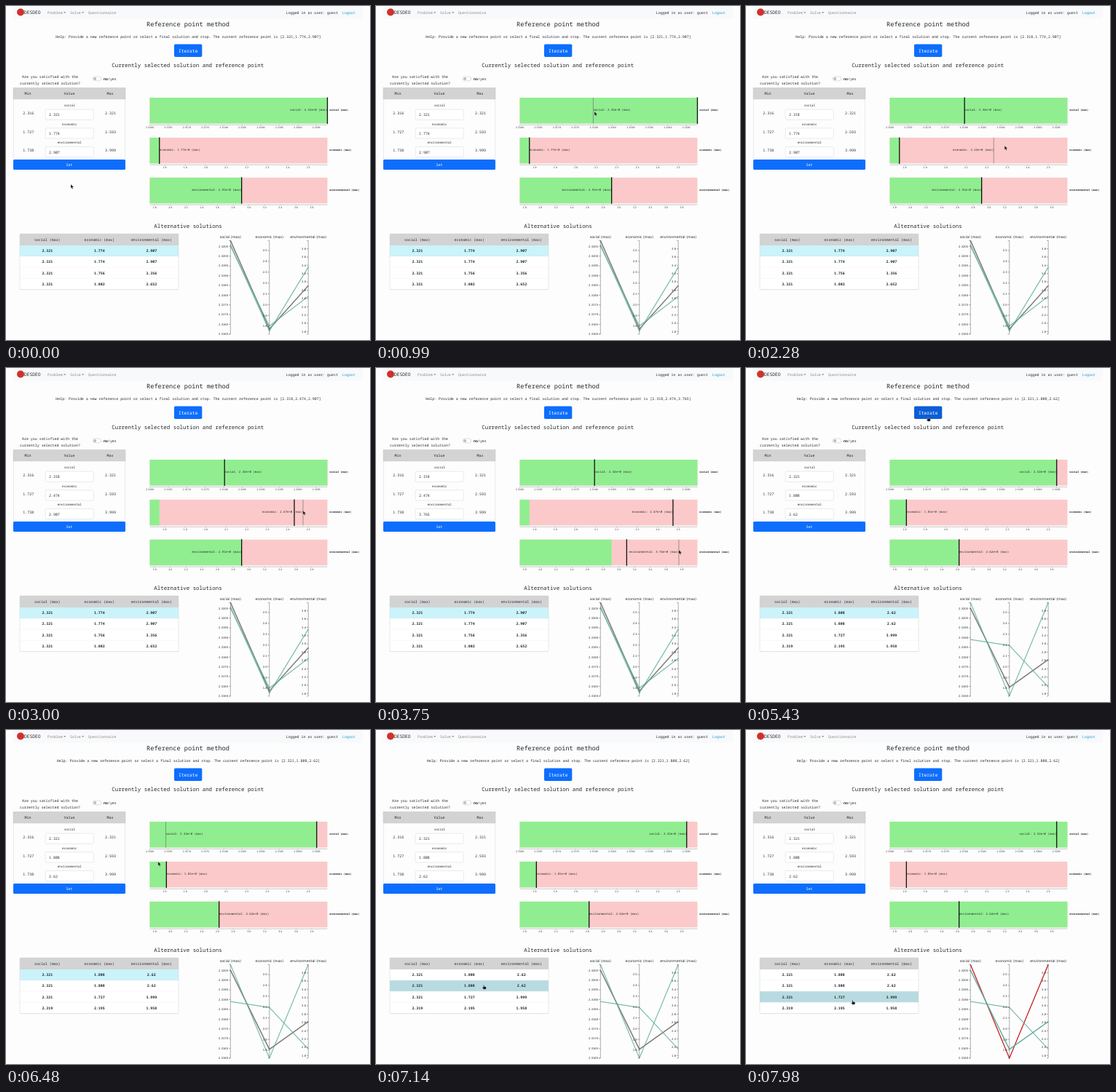
Animation of 500x459 px, one loop 8 s. Source, as an HTML page:

```html
<!DOCTYPE html>
<html lang="en">
<head>
<meta charset="utf-8">
<title>Reference point method</title>
<style>
html, body { margin: 0; width: 100%; height: 100%; overflow: hidden; background: #fdfdfd; }
svg { display: block; width: 100vw; height: 100vh; }
text { font-family: "Noto Sans Mono", "DejaVu Sans Mono", monospace; font-size: 4.95px; fill: #24282c; text-rendering: geometricPrecision; white-space: pre; }
.sans { font-family: "DejaVu Sans", sans-serif; }
</style>
</head>
<body>
<svg id="stage" viewBox="0 0 500 459"></svg>
<script>
const LOOP = 8000, LAG = 60, MOVE = 400, ITERATE = 5100;
const stage = document.getElementById('stage');

function add(tag, attrs, parent = stage) {
  const el = document.createElementNS('http://www.w3.org/2000/svg', tag);
  set(el, attrs);
  parent.appendChild(el);
  return el;
}
function set(el, attrs) {
  for (const k in attrs) el.setAttribute(k, attrs[k]);
}
const rect = (x, y, width, height, fill, more = {}) => add('rect', { x, y, width, height, fill, ...more });
const line = (x1, y1, x2, y2, stroke = '#444', w = 0.4) =>
  add('line', { x1, y1, x2, y2, stroke, 'stroke-width': w });
function text(str, x, y, { size = 4.95, anchor = 'start', fill = '#24282c', weight = 400, cls = '' } = {}) {
  const el = add('text', { x, y, 'text-anchor': anchor, class: cls });
  el.style.cssText = `font-size:${size}px;fill:${fill};font-weight:${weight}`;
  el.textContent = str;
  return el;
}
const mid = (str, x, y, opt) => text(str, x, y, { anchor: 'middle', ...opt });
const show = v => String(+v.toFixed(3));
const clamp = v => Math.max(0, Math.min(1, v));
const mix = (a, b, p) => a + (b - a) * p;
const cubic = p => p < 0.5 ? 4 * p ** 3 : 1 - 4 * (1 - p) ** 3;

const goals = [
  { name: 'social', min: 2.316, max: 2.3208, first: 2.316, step: 0.0005, digits: 4 },
  { name: 'economic', min: 1.727, max: 2.593, first: 1.8, step: 0.1, digits: 1 },
  { name: 'environmental', min: 1.738, max: 3.999, first: 1.8, step: 0.2, digits: 1 }
];
const part = (g, v) => (v - g.min) / (g.max - g.min);

const before = [
  [2.3208, 1.774, 2.907], [2.3208, 1.774, 2.907],
  [2.3206, 1.756, 3.356], [2.32051, 1.802, 2.652]
];
const after = [
  [2.32051, 1.808, 2.62], [2.32051, 1.808, 2.62],
  [2.3208, 1.727, 3.999], [2.3189, 2.195, 1.958]
];
const refs = [
  [-1000, before[0]],
  [1500, [2.31802, 1.774, 2.907]],
  [2700, [2.31802, 2.474, 2.907]],
  [3598, [2.31802, 2.474, 3.7649]],
  [ITERATE, after[0]]
];
const picks = [[-1000, 0], [7000, 1], [7680, 2]];
const pointer = [
  [0, 89, 245], [60, 89, 245], [840, 296, 150], [990, 300, 145], [1900, 300, 145],
  [2220, 340, 190], [2280, 355, 192], [2560, 408, 196], [3050, 408, 196],
  [3450, 416, 250], [4200, 416, 250], [4750, 252, 66], [5300, 250, 67.5],
  [6120, 250, 67.5], [6950, 148, 349], [7140, 148, 350.5], [7300, 148, 351],
  [7620, 146.5, 371.5], [LOOP, 146.5, 371.5]
];

// Navigation and headings
rect(10, 0, 480, 17.5, '#f8f9fa');
add('circle', { cx: 20, cy: 8.5, r: 5, fill: '#d0312d' });
text('DESDEO', 25, 11, { size: 6.25 });
const grey = { fill: '#858687' };
text('Problem', 57, 10.7, grey);
text('Solve', 88, 10.7, grey);
text('Questionnaire', 113, 10.7, grey);
for (const x of [79, 104]) add('path', { d: `M${x} 8.3h3.4l-1.7 1.8z`, fill: '#858687' });
text('Logged in as user: guest', 384.8, 10.7);
text('Logout', 462, 10.7, { fill: '#159bd7' });
mid('Reference point method', 250, 28.4, { size: 8.65 });
const help = mid('', 250.5, 43.8);
const iterate = rect(231, 52.5, 38.3, 17.5, '#0d6efd', { rx: 1.8 });
mid('Iterate', 250.2, 63.5, { size: 6.3, fill: '#fff' });
mid('Currently selected solution and reference point', 249.7, 84, { size: 7.42 });
mid('Alternative solutions', 250, 304.6, { size: 7.42 });

// Form
mid('Are you satisfied with the', 60.5, 98.6);
mid('currently selected solution?', 60.5, 107.5);
rect(119.2, 97, 11.5, 5.8, '#fff', { rx: 2.9, stroke: '#b9bcbf', 'stroke-width': 0.5 });
add('circle', { cx: 122.2, cy: 99.9, r: 2, fill: '#b9bcbf' });
text('no', 134, 101.6, { weight: 700 });
text('/yes', 139.94, 101.6);
rect(10.2, 112.5, 153.6, 99, '#fdfdfd', { stroke: '#d5d8db', 'stroke-width': 0.5 });
rect(10, 112.5, 154, 15.5, '#d3d3d3', { stroke: '#bfc1c3', 'stroke-width': 0.4 });
mid('Min', 30, 122.2, { weight: 500 });
mid('Value', 87, 122.2, { weight: 500 });
mid('Max', 143, 122.2, { weight: 500 });
const inputs = goals.map((g, i) => {
  const y = 142.2 + i * 25.6;
  mid(g.name, 87.3, y - 4.2, { size: 4.25 });
  mid(show(g.min), 30.7, y + 6.8);
  mid(show(g.max), 143.5, y + 6.8);
  rect(54.2, y, 66, 14.2, '#fff', { rx: 1.4, stroke: '#cfd4da', 'stroke-width': 0.5 });
  return text('', 59, y + 9.1);
});
rect(10, 211, 154, 14, '#0d6efd', { rx: 1.5 });
mid('Set', 87, 220, { fill: '#fff' });

// Bars
const LEFT = 197.5, WIDE = 244, TALL = 35.5;
const bars = goals.map((g, i) => {
  const y = 126 + i * 54.9;
  rect(LEFT, y, WIDE, TALL, '#fbc9c9');
  const green = rect(LEFT, y, 0, TALL, '#90ee90');
  const base = y + TALL + 1.9;
  line(LEFT, base, LEFT + WIDE, base, '#777');
  for (let v = g.first; v < g.max; v += g.step) {
    const x = LEFT + WIDE * part(g, v);
    line(x, base, x, base + 1.4, '#777');
    mid(v.toFixed(g.digits), x, base + 4.9, { size: 3.2, cls: 'sans', fill: '#333' });
  }
  text(g.name + ' (max)', 444.3, y + 18.1, { size: 3.62, weight: 700 });
  const mark = line(0, y - 0.5, 0, y + TALL + 0.5, '#111', 1.3);
  const hover = line(0, y, 0, y + TALL, '#666', 0.6);
  const label = text('', 0, y + 17.9, { size: 4.08 });
  return { y, green, mark, hover, label };
});

// Solutions table
rect(19, 313, 218, 16, '#d3d3d3');
goals.forEach((g, i) => mid(g.name + ' (max)', 56.8 + i * 71.5, 322.6, { weight: 500 }));
const rows = before.map((_, i) => {
  const y = 329 + i * 15.15;
  const back = rect(19, y, 218, 15.15, '#fff');
  line(19, y + 15.15, 237, y + 15.15, '#d5d8db');
  return { y, back, cells: goals.map((_, j) => mid('', 56.8 + j * 71.5, y + 9.2, { weight: 600 })) };
});
rect(19, 313, 218, 76.6, 'none', { stroke: '#cfd2d5', 'stroke-width': 0.5, rx: 1 });

// Parallel axes
const TOP = 322.3, BOTTOM = 450.9;
const axisX = [308.3, 361.8, 415.2];
const axisY = (i, v) => mix(BOTTOM, TOP, part(goals[i], v));
const paths = before.map(() => add('path', { fill: 'none', 'stroke-width': 1.25 }));
goals.forEach((g, i) => {
  const x = axisX[i];
  add('path', { d: `M${x - 2.2} ${TOP}H${x}V${BOTTOM}H${x - 2.2}`, fill: 'none', stroke: '#333', 'stroke-width': 0.4 });
  for (let v = g.first; v < g.max; v += g.step) {
    const y = axisY(i, v);
    line(x - 2.2, y, x, y, '#333');
    text(v.toFixed(g.digits), x - 3.2, y + 1.35, { size: 3.72, anchor: 'end', cls: 'sans' });
  }
  mid(g.name + ' (max)', x, 319.4, { size: 4.75, cls: 'sans' });
});

// Pointer, tip at the origin
const cursor = add('g', {});
const arrow = add('path', { d: 'M0 0V5.6L1.3 4.5L2.2 6.5L3.2 6L2.3 4.1H4Z', fill: '#111', stroke: '#fff', 'stroke-width': 0.25 }, cursor);
const hand = add('path', {
  d: 'M-.6 .3Q0-.4 .5 .3V2L3 2.5Q3.6 2.8 3.4 4L2.8 5.8H-.3L-2 3.6Q-1.8 2.7-.6 3.4Z',
  fill: '#111', stroke: '#fff', 'stroke-width': 0.25
}, cursor);

function at(t) {
  t = Math.max(0, t);
  const n = pointer.findIndex(k => k[0] > t);
  const [t0, x0, y0] = pointer[n - 1], [t1, x1, y1] = pointer[n];
  let p = (t - t0) / (t1 - t0);
  if (t1 - t0 > 350) p = p * p * (3 - 2 * p);
  return { x: mix(x0, x1, p), y: mix(y0, y1, p) };
}
const inside = (p, x, y, w, h) => p.x >= x && p.x <= x + w && p.y >= y && p.y <= y + h;
const latest = (list, t) => list.findLastIndex(k => k[0] <= t);

function render(t) {
  const tip = at(t), felt = at(t - LAG);
  const data = t < ITERATE ? before : after;
  const r = latest(refs, t), s = latest(picks, t);
  const [refTime, ref] = refs[r], oldRef = refs[Math.max(0, r - 1)][1];
  const refMove = refTime === ITERATE ? 1 : cubic(clamp((t - refTime) / MOVE));
  const [pickTime, pick] = picks[s], oldPick = picks[Math.max(0, s - 1)][1];
  const pickMove = cubic(clamp((t - pickTime) / 250));

  help.textContent = 'Help: Provide a new reference point or select a final solution and stop. '
    + `The current reference point is [${ref.map(show).join()}]`;
  const onButton = inside(tip, 231, 52.5, 38.3, 17.5);
  iterate.setAttribute('fill', onButton ? '#0b5ed7' : '#0d6efd');

  goals.forEach((g, i) => {
    const bar = bars[i];
    inputs[i].textContent = show(ref[i]);
    const fill = mix(part(g, data[oldPick][i]), part(g, data[pick][i]), pickMove);
    bar.green.setAttribute('width', WIDE * clamp(fill));
    const x = LEFT + WIDE * part(g, mix(oldRef[i], ref[i], refMove));
    set(bar.mark, { x1: x, x2: x });
    const over = inside(felt, LEFT, bar.y, WIDE, TALL);
    const lx = over ? felt.x : x;
    set(bar.hover, { x1: lx, x2: lx, visibility: over ? 'visible' : 'hidden' });
    const v = over ? g.min + (lx - LEFT) / WIDE * (g.max - g.min) : ref[i];
    bar.label.textContent = `${g.name}: ${v.toExponential(2)} (max)`;
    set(bar.label, { x: lx, 'text-anchor': lx > LEFT + WIDE / 2 ? 'end' : 'start' });
  });

  let onRow = false;
  rows.forEach((row, i) => {
    const over = inside(tip, 19, row.y, 218, 15.1);
    onRow = onRow || over;
    const color = i === pick ? (over ? '#b7dbe1' : '#cbf3fa') : (over ? '#ececec' : '#fff');
    row.back.setAttribute('fill', color);
    row.cells.forEach((cell, j) => { cell.textContent = show(data[i][j]); });
  });

  // The chosen solution lies under the others
  const order = [pick, ...data.keys()].filter((n, i) => i === 0 || n !== pick);
  order.forEach((n, i) => set(paths[i], {
    d: 'M' + data[n].map((v, j) => `${axisX[j]} ${axisY(j, v)}`).join('L'),
    stroke: i === 0 ? '#c4161c' : '#5fae9c',
    opacity: i === 0 ? 1 : 0.8
  }));

  const pointing = onButton || onRow || inside(tip, 10, 211, 154, 14);
  cursor.setAttribute('transform', `translate(${tip.x} ${tip.y})`);
  arrow.setAttribute('visibility', pointing ? 'hidden' : 'visible');
  hand.setAttribute('visibility', pointing ? 'visible' : 'hidden');
}

const start = performance.now();
function tick() {
  render((performance.now() - start) % LOOP);
  requestAnimationFrame(tick);
}
tick();
</script>
</body>
</html>
```
